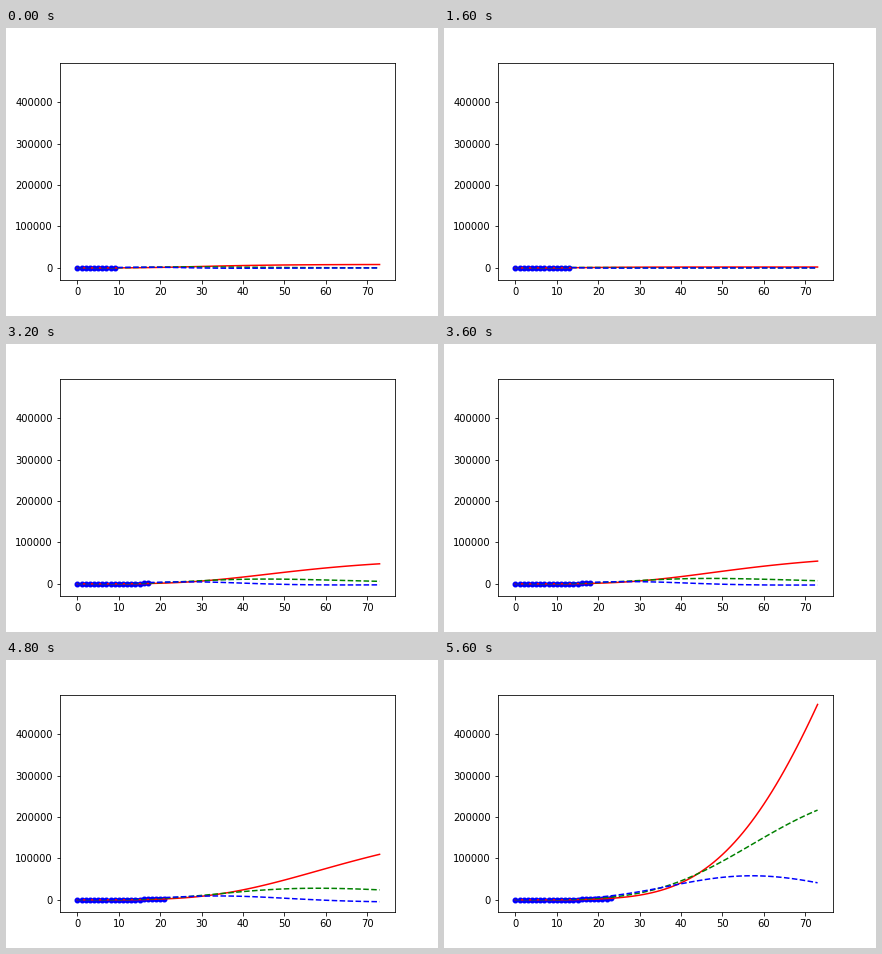
Write a matplotlib script that moves like this. It is 432x288 px and loops after 6000 ms.

```python
import numpy as np
import matplotlib.pyplot as plt
from matplotlib.animation import FuncAnimation

DPI = 72
STEPS = 15
FIRST_DAYS = 10
DAYS = np.arange(74)

# Forecast total on the last day, in thousands, at the turning points
KEY_STEPS = [0, 2, 5, 6, 7, 9, 12, 13, 14]
KEY_TOTALS = [8.1, 1, 2.6, 10.1, 42, 55, 110, 219.5, 472]


def forecast(step):
    """Gompertz curve of one step: its total, slope and curvature."""
    end = np.interp(step, KEY_STEPS, KEY_TOTALS)
    x = np.log(end / 10)
    # A larger forecast peaks later and grows more slowly
    peak = 30 + 8 * x + 0.5 * x**2 + 0.43 * x**3
    rate = (2.3 + 0.2 * (peak / 93) ** 4) / peak
    u = np.exp(-rate * (DAYS - peak))
    total = 1000 * end * np.exp(u[-1] - u)
    return total, rate * u * total, rate**2 * u * (u - 1) * total


cases = forecast(STEPS - 1)[0]

plt.rcParams["font.family"] = "DejaVu Sans"
plt.rcParams["font.size"] = 10
fig, ax = plt.subplots(figsize=(432 / DPI, 288 / DPI), dpi=DPI)
fig.subplots_adjust(left=0.125, right=0.9, bottom=0.125, top=0.88)
ax.set_xlim(-4.22, 76.68)
ax.set_ylim(-29264, 495870)

dots = ax.scatter([], [], s=20, color="blue", linewidths=1.5)
total_line, = ax.plot([], [], color="red")
slope_line, = ax.plot([], [], color="green", linestyle="--")
curve_line, = ax.plot([], [], color="blue", linestyle="--")


def update(step):
    known = FIRST_DAYS + step
    dots.set_offsets(np.column_stack([DAYS[:known], cases[:known]]))
    total, slope, curvature = forecast(step)
    total_line.set_data(DAYS, total)
    slope_line.set_data(DAYS, 10 * slope)
    curve_line.set_data(DAYS, 100 * curvature)
    return dots, total_line, slope_line, curve_line


anim = FuncAnimation(fig, update, frames=STEPS, interval=400,
                     repeat=True, repeat_delay=0, blit=False)
plt.show()
```
